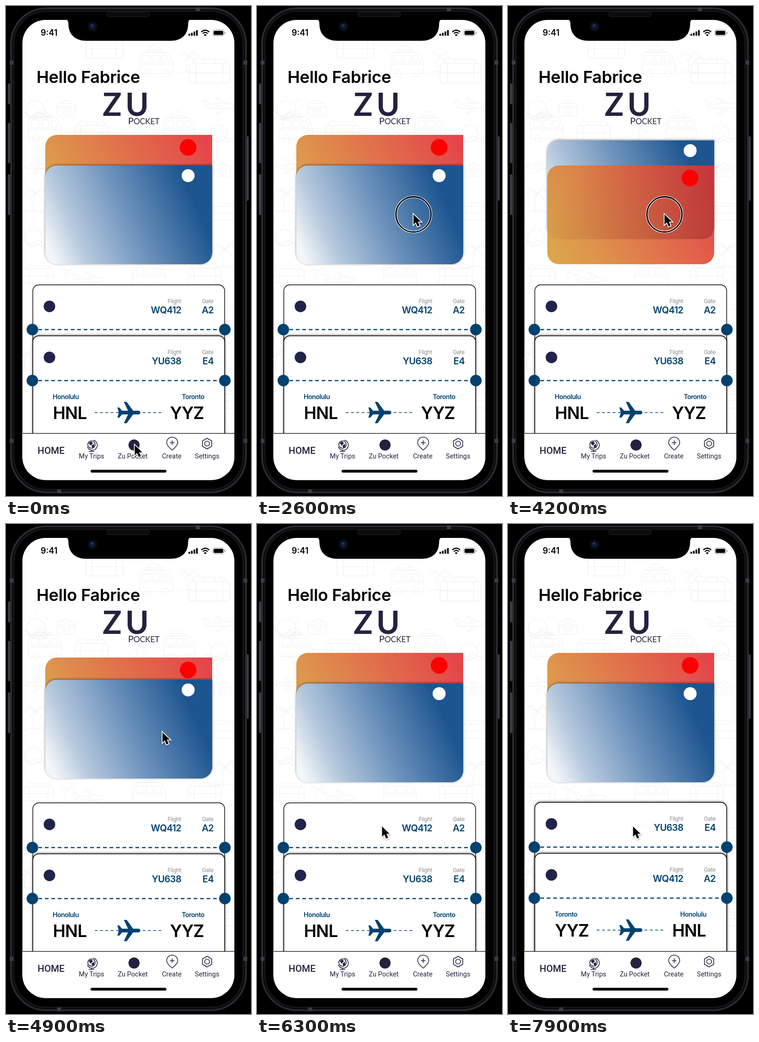
An HTML page for the animation above (8 s loop, 530 by 1057 pixels).

```html
<!DOCTYPE html>
<html lang="en">
<head>
<meta charset="utf-8">
<title>Travel wallet</title>
<style>
  html, body { margin: 0; width: 100%; height: 100%; overflow: hidden; background: #000; }
  svg { display: block; width: 100%; height: 100%; }
  text { font-family: Inter, sans-serif; }
  .nav text { font-family: Roboto, sans-serif; font-size: 14.5px; fill: #25223f; text-anchor: middle; }
  .mark text { font-family: Lato, sans-serif; fill: #25223f; }
  .label { font-size: 12px; fill: #8c8c8c; letter-spacing: -.3px; }
  .value { font-size: 20px; font-weight: 600; fill: #00426f; letter-spacing: -.7px; }
  .city { font-size: 14px; font-weight: 600; fill: #00426f; letter-spacing: -.5px; }
  .code { font-size: 36.5px; font-weight: 600; fill: #000; letter-spacing: -.9px; }
  .end { text-anchor: end; }
</style>
</head>
<body>
<svg viewBox="0 0 530 1057">
  <defs>
    <linearGradient id="blueFill" gradientUnits="userSpaceOnUse" x1="20" y1="205" x2="320" y2="70">
      <stop offset="0" stop-color="#f3f6f9"/><stop offset=".2" stop-color="#b7c9de"/>
      <stop offset=".55" stop-color="#6f94bd"/><stop offset="1" stop-color="#1d5590"/>
    </linearGradient>
    <linearGradient id="warmFill" gradientUnits="userSpaceOnUse" x1="20" y1="200" x2="350" y2="20">
      <stop offset="0" stop-color="#dca54b"/><stop offset=".22" stop-color="#de934c"/>
      <stop offset="1" stop-color="#e4454a"/>
    </linearGradient>
    <linearGradient id="shadeFill" gradientUnits="userSpaceOnUse" x1="80" y1="40" x2="361" y2="200">
      <stop offset="0" stop-color="#701418" stop-opacity=".03"/>
      <stop offset="1" stop-color="#701418" stop-opacity=".34"/>
    </linearGradient>
    <filter id="lift" x="-10%" y="-10%" width="120%" height="120%">
      <feDropShadow dx="0" dy="-1" stdDeviation="2.5" flood-opacity=".5"/>
    </filter>
    <filter id="soft" x="-50%" y="-50%" width="200%" height="200%">
      <feDropShadow dx="0" dy="2" stdDeviation="1.5" flood-opacity=".35"/>
    </filter>
    <path id="card" d="M25 0H361V188a25 25 0 0 1-25 25H25a25 25 0 0 1-25-25V25a25 25 0 0 1 25-25Z"/>
    <clipPath id="cardClip"><use href="#card"/></clipPath>
    <clipPath id="screen"><rect x="35.5" y="30" width="458.5" height="992.5" rx="50"/></clipPath>
    <clipPath id="content"><rect x="35" y="30" width="460" height="892"/></clipPath>

    <g id="van">
      <path d="M-42 28V-14q0-12 12-12H24q8 0 12 12l6 16V28Z M-42 4H42 M-34-18H-14V0H-34Z M-8-18H10V0H-8Z M16-18H26L33 0H16Z M-32-27H22 M-26-32H16"/>
      <circle cx="-23" cy="28" r="8"/><circle cx="24" cy="28" r="8"/>
      <path d="M-22-32q4-14 20-12l14 12"/>
    </g>
    <g id="bag">
      <rect x="-40" y="-16" width="80" height="38" rx="5"/>
      <path d="M-12-16v-9h24v9 M-26-16V22 M26-16V22 M-40 2H40 M-34-16q6-18 18-8 M16-24q14-4 18 8"/>
    </g>
    <g id="jet">
      <path d="M-34 4Q-24-5 0-5H24q10 0 12 5-4 6-14 6H-24q-8 0-10-2Z M-32 2l-8-15h7l11 10 M4-5L-10-18h6L16-5 M6 6L-10 20h7L18 6 M-14 0h22"/>
    </g>
    <g id="palm">
      <path d="M0 36Q-6 8 4-10 M4-10q-14-16-28 0 M4-10Q-8-30-20-22 M4-10q16-18 28 0 M4-10q8-22 22-12 M4-10q-12 4-13 16 M4-10q14 2 16 16 M-30 36q30-14 60 0"/>
    </g>
    <g id="camera">
      <rect x="-22" y="-13" width="44" height="30" rx="5"/><circle cy="2" r="10"/><circle cy="2" r="5"/>
      <path d="M-10-13l4-7H6l4 7 M-22-4h12 M10-4h12"/>
    </g>
    <g id="sun">
      <circle r="20"/><path d="M-34 10q8-8 17 0t17 0 17 0 17 0 M-28 18q7-6 14 0t14 0 14 0 14 0 M0-26v-7 M22-18l6-5 M-22-18l-6-5"/>
    </g>
  </defs>

  <!-- phone body -->
  <rect width="530" height="1057"/>
  <g fill="#3d3c44">
    <rect x="4" y="167" width="5" height="45" rx="2"/><rect x="4" y="252" width="5" height="87" rx="2"/>
    <rect x="4" y="363" width="5" height="88" rx="2"/><rect x="520.5" y="281" width="4.5" height="139" rx="2"/>
  </g>
  <rect x="11" y="5" width="508" height="1044" rx="76" fill="#08080a" stroke="#2a2930" stroke-width="4"/>
  <rect x="17" y="11" width="496" height="1032" rx="70" fill="#000" stroke="#17161a" stroke-width="3"/>
  <path d="M8 122h8M514 122h8M8 938h8M514 938h8M415 3v8M115 1043v8" stroke="#3c3b43" stroke-width="9"/>

  <g clip-path="url(#screen)">
    <rect x="35" y="30" width="460" height="993" fill="#fff"/>
    <g id="doodles" fill="none" stroke="#f0f0f0" stroke-width="1.2"></g>

    <text x="66" y="166" font-size="36" font-weight="600" letter-spacing="-.3">Hello Fabrice</text>
    <g class="mark">
      <text x="209" y="237" font-size="68" font-weight="700" letter-spacing="8">ZU</text>
      <text x="264" y="255" font-size="20">P<tspan font-size="17">OCKET</tspan></text>
    </g>

    <g id="cards">
      <g id="warm">
        <use href="#card" fill="url(#warmFill)"/>
        <g clip-path="url(#cardClip)"><use id="shade" href="#card" fill="url(#shadeFill)"/></g>
        <circle cx="309" cy="27" r="18" fill="#f00"/>
      </g>
      <g id="blue">
        <use href="#card" fill="url(#blueFill)" filter="url(#lift)"/>
        <circle cx="309" cy="22" r="14" fill="#fff"/>
      </g>
    </g>

    <g clip-path="url(#content)"><g id="tickets"></g></g>

    <g class="nav">
      <rect x="35" y="922" width="460" height="102" fill="#fff"/>
      <path d="M36 922H494" stroke="#2a2a30" stroke-width="1.4"/>
      <text x="97.5" y="966" style="font-size:20.5px;font-weight:500">HOME</text>
      <text x="185" y="976">My Trips</text>
      <text x="274" y="976">Zu Pocket</text>
      <text x="358.5" y="976">Create</text>
      <text x="435" y="976">Settings</text>
      <g fill="none" stroke="#25223f" stroke-width="1.6">
        <circle cx="185" cy="946" r="8"/>
        <path d="M189 936.500a11 11 0 1 1-13 14M185 957v4M179 961h12"/>
        <path d="M180 943l4-3 3 3-4 4ZM186 948l4-2v4l-3 2Z" fill="#25223f"/>
        <path d="M359.500 958Q347.500 948 347.500 942a12 12 0 0 1 24 0Q371.500 948 359.500 958ZM359.500 937v10M354.500 942h10"/>
        <path d="M435 932.500l10 5.700v11.600l-10 5.700-10-5.700v-11.600Z"/><circle cx="435" cy="944" r="5.300"/>
      </g>
      <circle cx="277" cy="947" r="12" fill="#25223f"/>
      <rect x="183" y="1000.500" width="164" height="6" rx="3"/>
    </g>

    <!-- status bar -->
    <text x="75" y="64" font-size="18" font-weight="600">9:41</text>
    <path d="M396.500 64v-4M402 64v-6M407.500 64v-9M413 64v-12" stroke="#000" stroke-width="3.600"/>
    <path d="M422.500 56q8.500-7.500 17 0M425.700 59.400q5.300-4.600 10.600 0" fill="none" stroke="#000" stroke-width="2.400"/>
    <path d="M428 62.200q3-2.400 6 0l-3 3Z"/>
    <rect x="447" y="51.500" width="25" height="13" rx="4" fill="none" stroke="#999"/>
    <rect x="449" y="53.500" width="21" height="9" rx="2.500"/>
    <path d="M474 56v4" stroke="#999" stroke-width="1.600"/>
  </g>

  <!-- notch -->
  <path d="M127 28q8 1 8 10C135 62 150 75 174 75H356C380 75 394 62 394 38q0-9 8-10Z"/>
  <rect x="218" y="13" width="92" height="10" rx="4" fill="#0b0b0c" stroke="#232326"/>
  <circle cx="187" cy="44" r="10.500" fill="#0b0d16"/>
  <circle cx="187" cy="44" r="6" fill="#111a38"/><circle cx="186" cy="42" r="2.200" fill="#283a70"/>

  <g id="ring" fill="none">
    <circle r="38" stroke="#fff" stroke-width="5"/><circle r="38" stroke="#000" stroke-width="2.800"/>
  </g>
  <g id="cursor">
    <path d="M0 0V24.500L5.700 19.200 9.800 29 14.600 27 10.500 17.400H18Z" transform="scale(.9)"
          stroke="#fff" stroke-width="3.600" paint-order="stroke" filter="url(#soft)"/>
  </g>
</svg>

<script>
const LOOP = 8000;
const $ = id => document.getElementById(id);
const mix = (a, b, p) => a + (b - a) * p;
const span = (t, start, length) => Math.min(1, Math.max(0, (t - start) / length));
const easeOut = p => 1 - Math.pow(1 - p, 1.7);
const easeBoth = p => p * p * (3 - 2 * p);
const move = (el, x, y) => el.setAttribute('transform', `translate(${x.toFixed(2)} ${y.toFixed(2)})`);

// kind, x, y, scale
const doodles = [
  ['van', 325, 122, .85], ['bag', 440, 142, 1.1], ['bag', 213, 90, 1], ['van', 84, 262, .85],
  ['sun', 64, 224, 1], ['jet', 462, 215, .9], ['palm', 392, 118, .8], ['camera', 130, 222, .9],
  ['bag', 185, 272, .9], ['palm', 285, 270, .8], ['van', 375, 262, .8], ['sun', 460, 275, .9],
  ['jet', 66, 345, .8], ['palm', 60, 415, .9], ['camera', 468, 355, .8], ['bag', 474, 445, .8],
  ['sun', 60, 500, .9], ['palm', 470, 535, .9], ['bag', 70, 580, .8], ['jet', 180, 590, .9],
  ['van', 310, 580, .85], ['bag', 430, 580, .9], ['palm', 130, 580, .6], ['sun', 485, 670, .8],
  ['palm', 42, 760, .8], ['bag', 490, 850, .8]
];
$('doodles').innerHTML = doodles.map(([kind, x, y, s]) =>
  `<use href="#${kind}" transform="translate(${x} ${y}) scale(${s})"/>`).join('');

function ticket(id, flight, gate, from, to) {
  const text = (x, y, cls, words) => `<text x="${x}" y="${y}" class="${cls}">${words}</text>`;
  return `<g id="${id}">
    <rect id="${id}Box" x="58" y=".5" width="415" height="360" rx="13" fill="#fff" stroke="#000" stroke-width="1.4"/>
    <circle cx="94" cy="47" r="12.5" fill="#20234a"/>
    ${text(379, 40, 'label end', 'Flight')}${text(449, 40, 'label end', 'Gate')}
    ${text(379, 61.5, 'value end', flight)}${text(449, 61.5, 'value end', gate)}
    <path d="M70 97H462" stroke="#00426f" stroke-width="2.4" stroke-dasharray="8 6"/>
    <circle cx="57" cy="97" r="12.5" fill="#00426f"/><circle cx="473.500" cy="97" r="12.5" fill="#00426f"/>
    ${text(101, 137, 'city', from[0])}${text(429, 137, 'city end', to[0])}
    ${text(101.5, 179.5, 'code', from[1])}${text(428, 179.5, 'code end', to[1])}
    <path d="M192 166H340" stroke="#00426f" stroke-width="1.4" stroke-dasharray="6 5.500"/>
    <path d="M241 155h4l6 7h13l-9-19h6l14 19h11q4.500 0 4.500 4t-4.500 4H275l-14 19h-6l9-19H251l-6 7h-4l3-11Z" fill="#00426f"/>
  </g>`;
}
const west = ['Honolulu', 'HNL'], east = ['Toronto', 'YYZ'];
$('tickets').innerHTML = ticket('first', 'WQ412', 'A2', east, west) + ticket('second', 'YU638', 'E4', west, east);

// time, x, y
const path = [
  [0, 278.5, 947], [800, 278.5, 947], [1600, 312.5, 544], [2050, 338.5, 449.5],
  [5300, 338.5, 449.5], [6200, 270.5, 652.5], [LOOP, 270.5, 652.5]
];
const clicks = [2500, 4080, 6550];
const HOLD = 350, SWAP = 700;

function pointer(t) {
  const i = path.findIndex((k, n) => n && t < k[0]);
  const [t0, x0, y0] = path[i - 1], [t1, x1, y1] = path[i];
  const p = easeBoth((t - t0) / (t1 - t0));
  return [mix(x0, x1, p), mix(y0, y1, p)];
}

function toFront(el) {
  if (el.parentNode.lastElementChild !== el) el.parentNode.appendChild(el);
}

function draw(t) {
  const [c1, c2, c3] = clicks.map(c => c + HOLD);
  const swap = start => easeOut(span(t, start, SWAP));

  const cards = swap(c1) - swap(c2);
  const warmTop = t >= c1 && t < c2;
  const warmY = mix(278, 344, cards), blueY = mix(344, 290, cards);
  toFront(warmTop ? $('warm') : $('blue'));
  move($('warm'), 85, warmY);
  move($('blue'), 85, blueY);
  move($('shade'), 0, blueY - warmY);
  $('shade').style.display = warmTop ? '' : 'none';

  const trips = swap(c3);
  const firstTop = t >= c3;
  toFront(firstTop ? $('first') : $('second'));
  move($('first'), 0, mix(601, 710, trips));
  move($('second'), 0, mix(711, 600, trips));
  $('firstBox').setAttribute('filter', firstTop ? 'url(#lift)' : 'none');
  $('secondBox').setAttribute('filter', 'url(#lift)');

  const [x, y] = pointer(t);
  move($('cursor'), x, y);
  move($('ring'), x, y);
  $('ring').style.display = clicks.some(c => t >= c && t < c + HOLD) ? '' : 'none';
}

function tick() {
  draw(performance.now() % LOOP);
  requestAnimationFrame(tick);
}
tick();
</script>
</body>
</html>
```
